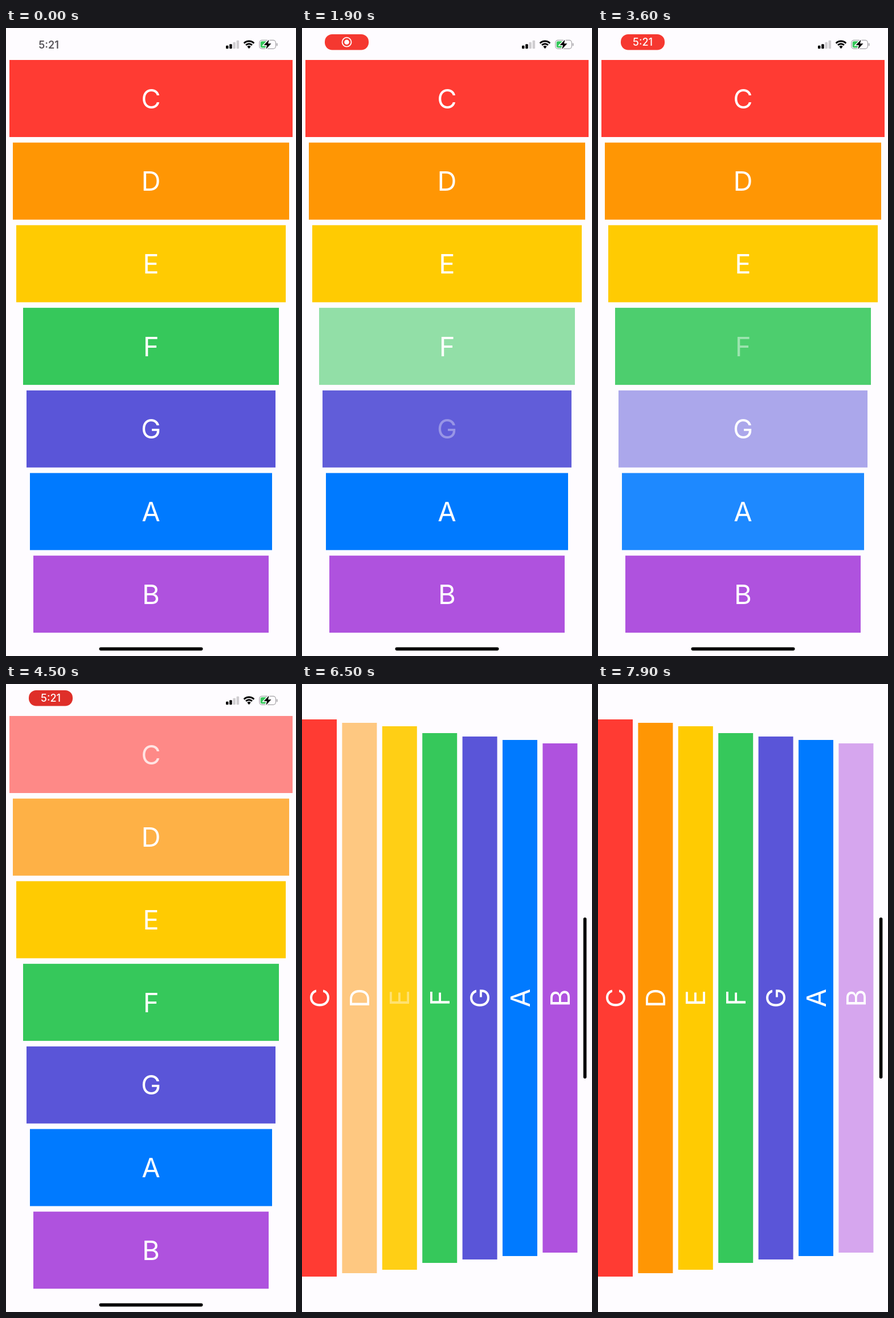
Animation, 509 px wide and 1100 px high, one loop 8000 ms. Source, as an HTML page with a canvas:

```html
<!DOCTYPE html>
<html lang="en">
<head>
<meta charset="utf-8">
<title>Xylophone</title>
<style>
  html, body { margin: 0; width: 100%; height: 100%; overflow: hidden; background: #fefcff; }
  canvas { display: block; width: 509px; height: 1100px; }
</style>
</head>
<body>
<canvas id="stage" width="509" height="1100"></canvas>
<script>
const ctx = document.getElementById('stage').getContext('2d');
const W = 509, H = 1100, LOOP = 8000, STEP = 100;
const PAPER = '#fefcff';

// note, colour, side inset, press times in ms
const KEYS = [
  ['C', '#ff3b33', 6, [723, 4280, 5890]],
  ['D', '#ff9604', 12, [970, 4057, 6195]],
  ['E', '#ffcb02', 18, [1260, 3781, 6425]],
  ['F', '#36c85b', 30, [1551, 3505, 6719]],
  ['G', '#5a55d8', 36, [1842, 3300, 7013]],
  ['A', '#007aff', 42, [2132, 3094, 7300]],
  ['B', '#af52de', 48, [2403, 2850, 7600]]
];

const clamp = x => Math.min(1, Math.max(0, x));
const ramp = (t, from, to) => clamp((t - from) / (to - from));
const ease = x => x * x * (3 - 2 * x);
const mix = (a, b, p) => a + (b - a) * p;

function pill(x, y, w, h, r, color) {
  ctx.fillStyle = color;
  ctx.beginPath();
  ctx.roundRect(x, y, w, h, r);
  ctx.fill();
}

function circle(x, y, r) {
  ctx.beginPath();
  ctx.arc(x, y, r, 0, 7);
}

function label(text, x, y, font, color) {
  ctx.font = font + ' Inter, sans-serif';
  ctx.textAlign = 'center';
  ctx.fillStyle = color;
  ctx.fillText(text, x, y);
}

// A pressed key dims to half and returns; its letter dims at once and recovers.
function keyState(presses, t) {
  let bar = 1, letter = 1;
  for (const start of presses) {
    const age = t - start;
    if (age < 0 || age > 600) continue;
    const dim = age < 300 ? ease(age / 300) : 1 - ease((age - 300) / 300);
    bar = Math.min(bar, 1 - dim / 2);
    letter = Math.min(letter, 0.2 + 0.8 * clamp(age / 310));
  }
  return { bar, letter };
}

function drawKeys(t, w, turn) {
  const height = mix(135, 61, turn), pitch = mix(144.7, 70.4, turn);
  KEYS.forEach(([note, color, inset, presses], i) => {
    const { bar, letter } = keyState(presses, t);
    const x = inset + 56 * turn, y = mix(56, 0, turn) + i * pitch;
    ctx.globalAlpha = bar;
    ctx.fillStyle = color;
    ctx.fillRect(x, y, w - 2 * x, height);
    ctx.globalAlpha = letter;
    label(note, w / 2, y + height / 2 + 17, '400 47px', '#fff');
  });
  ctx.globalAlpha = 1;
}

function drawClock(t, fade) {
  const recording = ramp(t, 50, 350), showTime = ramp(t, 3000, 3300);
  ctx.globalAlpha = fade * (1 - recording);
  label('5:21', 75, 35.5, '600 18px', '#58565a');

  const glow = 0.5 + 0.5 * Math.cos((t - 3600) / 1600 * 2 * Math.PI);
  const red = `rgb(${mix(222, 246, glow)},${mix(47, 56, glow)},${mix(41, 48, glow)})`;
  ctx.globalAlpha = fade * recording;
  pill(40, 11, 77, 27.5, 13, red);

  ctx.globalAlpha = fade * recording * (1 - showTime);
  ctx.strokeStyle = ctx.fillStyle = '#fff';
  ctx.lineWidth = 1.8;
  circle(78.5, 24.7, 8);
  ctx.stroke();
  circle(78.5, 24.7, 4.3);
  ctx.fill();

  ctx.globalAlpha = fade * showTime;
  label('5:21', 78.5, 31, '500 18px', '#fff');
}

function drawIcons(fade) {
  ctx.globalAlpha = fade;
  [5.5, 8, 11.5, 14.5].forEach((h, i) =>
    pill(386 + i * 6.2, 36.3 - h, 4.5, h, 1.2, i < 2 ? '#000' : '#cfcdd0'));

  // Wi-Fi
  ctx.strokeStyle = ctx.fillStyle = '#000';
  ctx.lineWidth = 3;
  const from = -Math.PI * 0.75, to = -Math.PI * 0.25;
  for (const r of [12.4, 7.7]) {
    ctx.beginPath();
    ctx.arc(426.5, 35.5, r, from, to);
    ctx.stroke();
  }
  ctx.beginPath();
  ctx.moveTo(426.5, 36.2);
  ctx.arc(426.5, 35.5, 4.4, from, to);
  ctx.fill();

  // Battery
  ctx.strokeStyle = '#a4a2a6';
  ctx.lineWidth = 1.2;
  ctx.beginPath();
  ctx.roundRect(444.8, 21.3, 28.6, 15, 4.5);
  ctx.stroke();
  pill(474.8, 26.5, 1.7, 5, 0.8, '#a4a2a6');
  pill(446.7, 23.2, 11.5, 11.2, [2.7, 0, 0, 2.7], '#34c759');
  const bolt = new Path2D('M461.5 20.5 L452.5 30 H458 L456.3 37 L465.5 27.3 H460 Z');
  ctx.strokeStyle = PAPER;
  ctx.lineWidth = 3;
  ctx.stroke(bolt);
  ctx.fillStyle = '#000';
  ctx.fill(bolt);
}

function drawIndicator(w, y, length, alpha) {
  ctx.globalAlpha = alpha;
  pill((w - length) / 2, y, length, 5.6, 2.8, '#000');
  ctx.globalAlpha = 1;
}

function draw(t) {
  const turn = ease(ramp(t, 4850, 5300));
  const w = mix(W, H, turn), h = mix(H, W, turn);
  const fade = 1 - ramp(t, 4800, 4950);

  ctx.fillStyle = '#000';
  ctx.fillRect(0, 0, W, H);
  ctx.save();
  ctx.translate(W / 2, H / 2);
  ctx.rotate(-turn * Math.PI / 2);
  ctx.translate(-w / 2, -h / 2);
  ctx.fillStyle = PAPER;
  ctx.fillRect(0, 0, w, h);
  drawKeys(t, w, turn);
  if (fade > 0) {
    drawClock(t, fade);
    drawIcons(fade);
    drawIndicator(w, h - 15.2, 182, fade);
  }
  drawIndicator(w, h - 15.2, 282, ramp(t, 5350, 5600));
  ctx.restore();
}

function tick() {
  const t = performance.now() % LOOP;
  draw(Math.floor(t / STEP) * STEP);
  requestAnimationFrame(tick);
}
tick();
</script>
</body>
</html>
```
